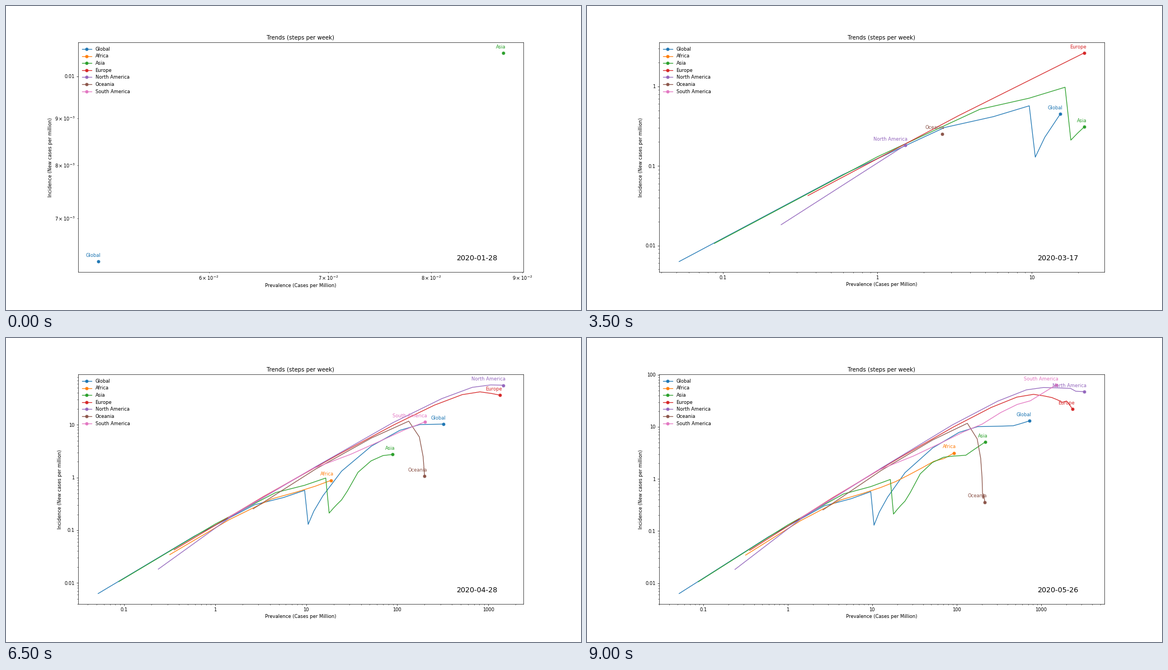
A matplotlib script for the animation above (10000 ms loop, 1028 by 544 pixels).

```python
import matplotlib.pyplot as plt
import numpy as np
from matplotlib.animation import FuncAnimation

WIDTH, HEIGHT, DPI = 1028, 544, 60.47
WEEKS = 19
START = np.datetime64("2020-01-28")

# name: first week, first prevalence, first incidence, then phases of
# (last week, incidence reached, easing power; 1 is steady growth or decay)
REGIONS = {
    "Global": (0, 0.052, 0.00628, [
        (2, 0.304, 1.5), (4, 0.57, 1), (5, 0.129, 1), (8, 1.32, 0.7),
        (11, 10.1, 1.9), (15, 10.5, 1), (18, 13, 1)]),
    "Africa": (8, 0.318, 0.0344, [
        (11, 0.53, 2), (13, 0.885, 1), (16, 2.18, 1), (18, 3.15, 0.6)]),
    "Asia": (0, 0.0878, 0.0106, [
        (2, 0.516, 1.5), (4, 0.976, 1), (5, 0.211, 1), (8, 0.375, 1),
        (9, 0.552, 1), (13, 2.735, 2.5), (15, 2.85, 1), (18, 5.12, 1)]),
    "Europe": (5, 0.355, 0.0424, [
        (11, 42.1, 2.25), (13, 36.5, 1), (15, 29.6, 1), (16, 31.3, 1),
        (18, 22.1, 1)]),
    "North America": (6, 0.238, 0.01825, [
        (9, 10.9, 1.1), (12, 57, 2.5), (15, 54.7, 1), (16, 48.3, 1),
        (18, 47.4, 1)]),
    "Oceania": (7, 2.62, 0.254, [
        (10, 11.7, 1.5), (11, 5.87, 1), (14, 0.45, 1), (15, 0.42, 1),
        (16, 0.51, 1), (18, 0.358, 1)]),
    "South America": (8, 1.4, 0.175, [
        (9, 1.45, 1), (13, 11.3, 1.3), (16, 31.6, 1.7), (18, 63.9, 1)]),
}


def weekly_incidence(week, level, phases):
    """Ease the incidence from phase to phase on a log scale."""
    values = [level]
    for end, goal, power in phases:
        steps = end - week
        left = (1 - np.arange(1, steps + 1) / steps) ** power
        values.extend(goal * (level / goal) ** left)
        week, level = end, goal
    return np.array(values)


def add_region(name, first, x0, y0, phases):
    """Prevalence grows by seven days of incidence every week."""
    y = weekly_incidence(first, y0, phases)
    x = x0 + 7 * np.append(0, np.cumsum(y[1:]))
    line, = ax.plot(x, y, "o-", markevery=[-1], label=name)
    tag = ax.annotate(name, (x[0], y[0]), xytext=(5, 10),
                      textcoords="offset points", ha="right",
                      color=line.get_color())
    return first, x, y, line, tag


# the small surplus keeps the pixel size from being rounded down
fig, ax = plt.subplots(
    figsize=((WIDTH + 0.001) / DPI, (HEIGHT + 0.001) / DPI), dpi=DPI)
fig.subplots_adjust(left=0.125, right=0.9, bottom=0.125, top=0.88)
ax.set_xscale("log")
ax.set_yscale("log")
ax.xaxis.set_major_formatter("{x:g}")
ax.yaxis.set_major_formatter("{x:g}")
ax.set_title("Trends (steps per week)")
ax.set_xlabel("Prevalence (Cases per Million)")
ax.set_ylabel("Incidence (New cases per million)")
date = ax.text(0.8495, 0.05, "", fontsize=15, transform=ax.transAxes)

regions = [add_region(name, *data) for name, data in REGIONS.items()]
ax.legend(loc="upper left", frameon=False, labelspacing=0.43)


def update(frame):
    week = min(frame, WEEKS - 1)
    for first, x, y, line, tag in regions:
        count = week - first + 1
        line.set_visible(count > 0)
        tag.set_visible(count > 0)
        if count > 0:
            line.set_data(x[:count], y[:count])
            tag.xy = x[count - 1], y[count - 1]
    # the last week keeps the date of the one before it
    date.set_text(str(START + 7 * min(week, WEEKS - 2)))
    ax.relim(visible_only=True)
    ax.autoscale_view()


anim = FuncAnimation(fig, update, frames=WEEKS + 1, interval=500,
                     repeat=True, repeat_delay=0)
plt.show()
```
